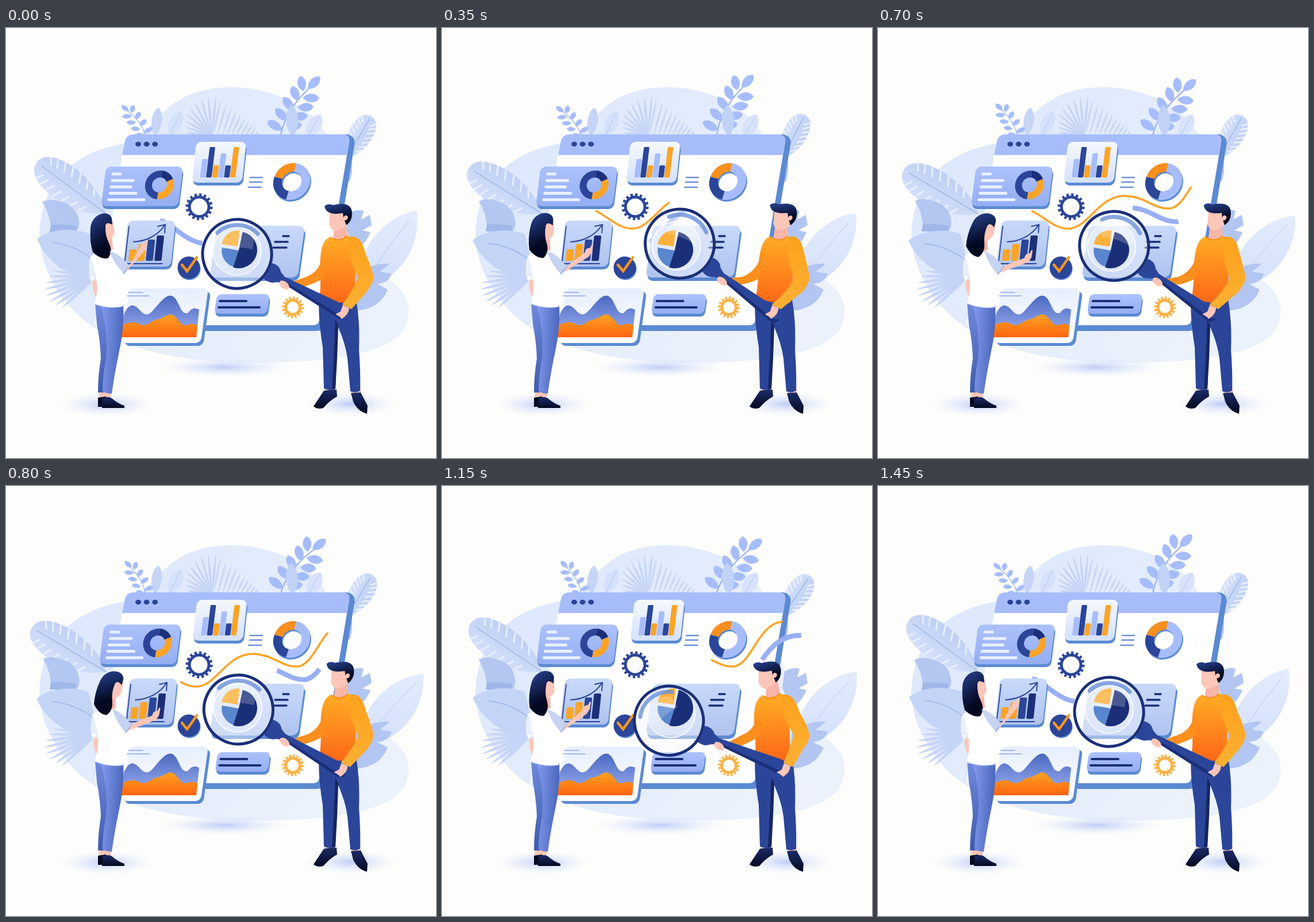
These frames come from a looping animation (748 px wide and 748 px high, 1.5 s). An HTML page:

```html
<!DOCTYPE html>
<html lang="en">
<head>
<meta charset="utf-8">
<title>Data analysis</title>
<style>
html, body { margin: 0; height: 100%; overflow: hidden; background: #fdfdfb; }
svg { display: block; width: 100vw; height: 100vh; }
</style>
</head>
<body>
<svg id="stage" viewBox="0 0 748 748"></svg>
<script>
const NAVY = '#2b4599', DARK = '#1b2f78', EDGE = '#5b8ad2', SKY = '#a7bdfb', SKIN = '#fcc6b8', ORANGE = '#fca426';
const list = (n, f) => Array.from({ length: n }, (_, i) => f(i)).join('');
const shape = (d, fill, more = '') => `<path d="${d}" fill="${fill}" ${more}/>`;
const line = (d, color, w, more = '') =>
  `<path d="${d}" fill="none" stroke="${color}" stroke-width="${w}" stroke-linecap="round" ${more}/>`;
const group = (id, body) => `<g id="${id}">${body}</g>`;
const slant = (x, y, a, body) => `<g transform="translate(${x} ${y}) skewX(${-a})">${body}</g>`;
const grad = (id, a, b, x = 0, y = 1) =>
  `<linearGradient id="${id}" x2="${x}" y2="${y}"><stop stop-color="${a}"/><stop offset="1" stop-color="${b}"/></linearGradient>`;
const polar = (x, y, r, a) => `${x + r * Math.cos(a * Math.PI / 180)} ${y + r * Math.sin(a * Math.PI / 180)}`;
const arc = (x, y, r, a, b) => `${polar(x, y, r, a)}A${r} ${r} 0 ${+(b - a > 180)} 1 ${polar(x, y, r, b)}`;
const ring = (x, y, r, w, a, b, color) => `<path d="M${arc(x, y, r, a, b)}" fill="none" stroke="${color}" stroke-width="${w}"/>`;
const wedge = (x, y, r, a, b, color) => shape(`M${x} ${y}L${arc(x, y, r, a, b)}Z`, color);
const card = (x, y, w, h, skew, r, fill, dx = 2, dy = 5, edge = EDGE) => {
  const box = (ox, oy, f) => `<rect x="${ox}" y="${oy}" width="${w}" height="${h}" rx="${r}" fill="${f}"/>`;
  return slant(x, y, skew, box(dx, dy, edge) + box(0, 0, fill));
};
const columns = (data, step, w) =>
  data.map(([h, c], i) => `<rect x="${step * i}" y="${-h}" width="${w}" height="${h}" rx="2" fill="${c}"/>`).join('');
// tip: 0.8 is pointed, above 1 is blunt
const leaf = (x, y, l, w, a, fill, inner = '', tip = .8) => `<g transform="translate(${x} ${y}) rotate(${a})">` +
  shape(`M0 0C${.3 * l} ${-w} ${tip * l} ${-w} ${l} 0C${tip * l} ${w} ${.3 * l} ${w} 0 0`, fill) + inner + '</g>';
const bananaLeaf = (x, y, l, w, a) => leaf(x, y, l, w, a, 'url(#pale)', line(`M0 0H${l * .93}`, '#9db8ea', 1.5) + list(14, i => {
  const s = .25 + .6 * (i >> 1) / 7, side = i % 2 ? 1 : -1;
  const ex = l * (.9 * (1 - s) ** 2 * s + 3 * (1 - s) * s * s + s ** 3), ey = 3 * s * (1 - s) * w * side;
  return line(`M${ex - 7} ${ey * .5}L${ex} ${ey * .96}`, '#e8effd', 3);
}), 1);
const gear = (x, y, r, w, color) => `<circle cx="${x}" cy="${y}" r="${r}" fill="none" stroke="${color}" stroke-width="${w}"/>
  <circle cx="${x}" cy="${y}" r="${r + w / 2 + 1.5}" fill="none" stroke="${color}" stroke-width="5" pathLength="32" stroke-dasharray="1 1"/>`;
const shadow = (x, y, rx, ry) => `<ellipse cx="${x}" cy="${y}" rx="${rx}" ry="${ry}" fill="url(#shade)"/>`;

const branch = (pairs, step) => line('M0 0Q8 -42 48 -80', '#93adee', 2) + leaf(47, -80, 30, 10, -45, SKY) + list(pairs, i => {
  const k = i * step, x = 39 - 9 * k, y = -76 + 17 * k;
  return leaf(x, y, 27 + k, 10, -100 - 12 * k, SKY) + (k < 4 ? leaf(x - 1, y + 11, 29 - k, 10, 3 - 4 * k, SKY) : '');
});

const defs = `<defs>
  ${grad('blob', '#dbe6fd', '#ebf2fb', 1, .6)}${grad('sheet', '#f5f8ff', '#d3e1fc')}${grad('sky', '#adc2fc', '#94aef3')}
  ${grad('panel', '#c9d9fb', '#aec3ee')}${grad('paper', '#e6eefe', '#ffffff')}${grad('wave', '#4c69c0', '#9fb3f4')}
  ${grad('lava', '#ffa322', '#ff6410')}${grad('jean', '#869cee', '#4a67bc', 1, .2)}${grad('jeanBack', '#6f89dc', '#3f5cae')}
  ${grad('hair', '#2a4596', '#040922', .3, .8)}${grad('knit', '#ffae25', '#ff6716')}${grad('sleeve', '#ffa11d', '#fbb033')}
  ${grad('shoe', '#1b2b68', '#050a20')}${grad('pale', '#d3dffa', '#bfd0f5')}${grad('wide', '#e3ecfd', '#d3e0fa')}
  <radialGradient id="shade"><stop stop-color="#a9bdf6" stop-opacity=".75"/><stop offset="1" stop-color="#dfe8fd" stop-opacity="0"/></radialGradient>
</defs>`;

const backdrop = shape('M390 103C455 103 520 128 553 178C590 240 590 380 645 425C690 448 706 475 699 505C690 560 600 577 470 582C330 586 190 566 118 492C74 445 48 385 62 325C76 255 130 215 200 202C265 188 265 105 390 103Z', 'url(#blob)')
  + shadow(380, 590, 115, 17) + shadow(175, 655, 82, 21) + shadow(600, 654, 80, 21);

const plants =
  list(9, i => leaf(358, 188, 44 + 26 * Math.sin(i / 5), 2.6, -172 + 11 * i, '#c6d4f5'))
  + list(10, i => leaf(360 + 8 * i, 188, 65 - 6 * i, 2.4, -78 + 3 * i, '#c9d7f7'))
  + leaf(259, 188, 50, 12, -83, '#c6d5f7') + leaf(284, 188, 49, 15, -64, '#d5e1fb', line('M0 0H44', '#b4c8f0', 1))
  + group('sprig', `<g transform="translate(242 187) scale(-.6 .52)">${branch(4, 1.3)}</g>`)
  + group('bough', `<g transform="translate(478 186)">${branch(5, 1)}</g>`)
  + leaf(499, 190, 56, 14, -93, '#c2d2f6') + leaf(524, 190, 46, 16, -59, '#d8e3fb', line('M0 0H42', '#b4c8f0', 1))
  + group('banana', bananaLeaf(174, 323, 150, 42, -143.5))
  + group('lobe', shape('M63 303Q75 296 92 301Q121 308 126 331Q130 345 122 355H78Q78 325 63 303Z', '#b3c7f0')
    + shape('M78 343Q95 340 122 344V355H76Z', '#a0b8e9'))
  + list(9, i => leaf(158, 432, 82 + 14 * Math.sin(i / 2), 3.6, 138 + 7 * i, '#c6d5f7'))
  + group('broad', shape('M54 367C75 350 115 346 145 358L160 432C120 440 72 412 54 367Z', '#c4d4f7')
    + line('M82 373Q120 378 150 402', '#9db8ea', 1.6))
  + line('M598 225Q602 245 596 265', '#adc3ee', 5)
  + group('crest', bananaLeaf(593, 226, 84, 28, -60))
  + group('wing', shape('M620 455C600 390 660 325 714 318C722 365 700 432 620 455Z', 'url(#wide)') + line('M622 450Q655 390 702 335', '#c4d4f5', 1.2))
  + shape('M596 322Q612 314 622 318L618 333L633 325L636 343L620 352L634 355Q626 376 606 388L592 350Z', '#b2c6f1')
  + shape('M608 430Q635 408 668 410L650 424L671 427Q666 444 645 445L664 455Q650 490 606 492Z', '#b2c6f1');

const screen = shape('M222 185H592Q609 187 606 204L554 516Q552 527 540 527H165Z', EDGE)
  + shape('M222 185H586Q599 186 597 198L545 509Q543 517 534 517H154L202 221L208 196Q211 185 222 185Z', '#fff')
  + shape('M222 185H586Q599 186 597 198L593 221H202L207 196Q210 185 222 185Z', SKY)
  + list(3, i => `<ellipse cx="${230 + 14.6 * i}" cy="202" rx="5" ry="4.2" fill="${NAVY}"/>`);

const ribbons =
  line('M268 335C290 340 315 376 350 375C385 373 400 311 443 313C475 315 490 337 520 337C555 333 560 255 630 260', '#99aff4', 8.5, 'id="ribbon" pathLength="435" stroke-dasharray="85 350" style="stroke-linecap:butt"')
  + line('M267 318C292 330 308 350 332 349C366 348 384 291 430 292C466 293 480 316 508 314C540 309 550 238 593 236', ORANGE, 3.5, 'id="trend" pathLength="396" style="stroke-linecap:butt"');

const textCard = card(174, 241, 134, 69, 7, 9, 'url(#sky)')
  + [[186, 199], [185, 221], [183, 217], [181, 226], [179, 240]].map(([a, b], i) => line(`M${a} ${254 + 11.2 * i}H${b}`, '#e9f0ff', 5)).join('')
  + slant(267, 273, 5, ring(0, 0, 19, 12, 95, 275, NAVY) + ring(0, 0, 19, 12, 275, 335, DARK) + ring(0, 0, 19, 12, 335, 455, ORANGE));

const bars = [[32, SKY], [53, NAVY], [21, ORANGE], [42, SKY], [21, NAVY], [53, ORANGE]];
const barCard = card(331, 198, 87, 71, 6, 9, 'url(#sheet)') + slant(337.5, 260, 7, columns(bars, 10.4, 9.6));

const growth = [[20, ORANGE], [29, ORANGE], [37, NAVY], [44, DARK]];
const growthCard = card(212, 335, 83, 80, 6, 9, 'url(#panel)')
  + line('M214 345L207 405M208 410H272', NAVY, 1.8) + slant(213, 405, 6, columns(growth, 15, 12.5))
  + line('M222 372C245 371 265 360 276 343M264 345L277 342L276 356', NAVY, 2);

const areaCard = card(215, 453, 137, 95, 8, 9, 'url(#paper)', 5, 5)
  + line('M213 460H238M211 466H249', '#a4b9ef', 2) + '<g transform="translate(-2 1)">'
  + shape('M201 537L207 497C217 475 226 480 235 490S250 499 258 490C272 474 285 456 296 469C305 480 306 497 318 495C326 484 333 486 338 489L333 537Z', 'url(#wave)')
  + shape('M201 537L204 515C214 513 222 508 232 513C247 522 252 508 265 506S285 491 296 501S306 519 318 515Q328 512 335 516L333 537Z', 'url(#lava)') + '</g>';

const noteCard = card(367, 463, 92, 34, 8, 8, 'url(#sky)') + line('M372 475H418M370 486H441', DARK, 4);
const pieCard = card(367, 344, 153, 90, 8, 10, 'url(#panel)', 3, 6)
  + line('M482 362H492M468 372H490M465 382H488', DARK, 3.4);
const donut = slant(497, 267, 6, ring(2, 3, 24.5, 15, 0, 359.9, EDGE) + ring(0, 0, 24.5, 15, 0, 359.9, SKY)
  + ring(0, 0, 24.5, 15, 195, 278, '#fb8f1c') + ring(0, 0, 24.5, 15, 102, 195, NAVY));

const cards = group('textCard', textCard) + group('barCard', barCard)
  + gear(336, 311, 17, 5, NAVY) + line('M425 260H446M424 268H445M422 277H444', '#6d8fd4', 2.4)
  + donut + group('growthCard', growthCard)
  + `<circle cx="319" cy="419" r="19.5" fill="${EDGE}"/><circle cx="318" cy="417" r="19.5" fill="${NAVY}"/>`
  + line('M306 412L315 423L332 399', '#fb961e', 4.5) + areaCard + group('noteCard', noteCard)
  + gear(499, 486, 12.5, 5, '#fbb247') + pieCard;

const lens = `<circle id="glass" r="59" fill="#f1f6ff" opacity=".45"/>
  <circle id="halo" r="42" fill="#fff" fill-opacity=".3" stroke="#fff" stroke-width="1.5"/>`
  + wedge(405, 387, 30, 105, 190, '#5a86cf') + wedge(405, 386, 32, -78, 108, DARK) + wedge(403, 380, 28, -172, -83, '#fbb03a')
  + group('glare', line('M-34 -37A50 50 0 0 1 36 -35', '#6c92d8', 7, 'opacity=".8"')
    + shape('M-30 -30A42 42 0 0 1 30 -30L27 -8Q0 -15 -27 -8Z', '#fff', 'opacity=".2"'));

const rim = `<g transform="translate(402 393) rotate(28.8)">
  <circle r="60" fill="none" stroke="${DARK}" stroke-width="5"/>
  ${shape('M60 -15Q74 -19 82 -9L92 -5L206 -12Q218 -12 218 0Q218 13 206 13L92 6L82 11Q74 19 60 15Q64 0 60 -15Z', NAVY)}
  ${shape('M86 9L92 6L206 13Q218 12 218 0Q212 7 204 7L92 2Z', DARK)}</g>`;

const womanLegs = shape('M161 628H183L182 645H162Z', SKIN)
  + shape('M155 478H190L178 560L170 634H160Q160 605 165 575Q164 545 158 515Z', 'url(#jeanBack)')
  + shape('M165 482H204Q206 520 197 562Q189 600 184 636Q174 636 168 632Q168 605 174 575Q178 530 165 482Z', 'url(#jean)')
  + shape('M160 643L174 641L178 659H160Z', '#060b22') + shape('M168 644Q178 640 184 644Q194 653 206 657V661H167Z', 'url(#shoe)');
const woman = shape('M150 440L160 438Q158 452 163 470L156 467Q150 456 150 440Z', SKIN)
  + shape('M147 397Q162 389 180 386Q197 390 203 408Q198 440 205 471L203 484Q180 489 154 480Q162 455 156 432L149 442L145 431Q143 412 147 397Z', '#fff')
  + shape('M147 397Q154 415 156 432L146 433Q142 410 147 397Z', '#e8effd') + line('M146 432L157 430M154 480Q180 489 203 484', '#d9e4fb', 1.5)
  + shape('M170 362L184 364L186 385Q178 392 168 387Z', '#f8b5a8')
  + group('womanHead', shape('M170 336L185 335L189 354Q187 366 179 369Q170 364 170 350Z', SKIN)
    + shape('M147 348C149 322 179 315 184 331L185 342Q174 336 173 344Q172 360 179 374Q186 388 178 400Q166 404 151 390Q145 370 147 348Z', 'url(#hair)'))
  + shape('M180 388Q201 394 215 415L205 427Q193 415 186 402Z', '#c6d3f2') + line('M215 415L205 427', '#93aee4', 2);

const manLegs = shape('M554 622H573L571 638L556 642ZM600 626H617L618 641L604 644Z', SKIN)
  + shape('M545 470Q542 500 551 555L553 627Q563 632 573 628L577 518Q591 550 594 575L599 632Q608 636 616 631Q617 600 614 560Q616 510 609 472Z', NAVY)
  + shape('M573 507L578 518L576 575L573 628L567 629L571 555Z', '#16265f')
  + shape('M553 631Q562 629 575 629L576 641Q563 648 552 661Q541 664 535 658Z', 'url(#shoe)')
  + shape('M600 635L617 634L629 657L628 671Q612 667 604 650Z', 'url(#shoe)');
const man = shape('M571 342L591 338L594 362Q582 374 569 366Z', '#f8b5a8')
  + shape('M562 364Q579 373 594 361Q608 365 609 388L606 476Q575 482 545 470C550 440 544 412 548 390Q551 370 562 364Z', 'url(#knit)')
  + line('M564 364Q579 374 593 362', '#f78b1a', 2)
  + group('manHead', shape('M563 320L562 342Q566 354 577 353L591 345L592 320Z', SKIN)
    + `<circle cx="592" cy="331" r="5" fill="${SKIN}"/>`
    + shape('M554 310Q560 304 569 308Q602 300 602 323Q602 336 592 343L589 335Q597 333 594 327Q589 324 587 330L586 322Q557 327 554 310Z', 'url(#hair)'));

const stage = document.getElementById('stage');
stage.innerHTML = defs + '<rect width="748" height="748" fill="#fdfdfb"/>' + backdrop + plants + screen + ribbons + cards + lens
  + womanLegs + group('woman', woman) + shape('', SKIN, 'id="pointArm"')
  + manLegs + group('man', man) + shape('', '#f98f1e', 'id="farArm"') + group('rim', rim)
  + `<ellipse id="farHand" rx="10" ry="6" fill="${SKIN}"/>` + shape('', SKIN, 'id="nearHand"') + shape('', 'url(#sleeve)', 'id="nearArm"');

const PERIOD = 1450, KEYS = [0, 200, 500, 700, 950, 1150];
// Smooth periodic curve through one value per key time
function track(v, t) {
  const n = KEYS.length, wrap = i => (i + n) % n;
  const time = i => KEYS[wrap(i)] + PERIOD * Math.floor(i / n);
  const value = i => v[wrap(i)];
  const slope = i => (value(i + 1) - value(i - 1)) / (time(i + 1) - time(i - 1));
  t %= PERIOD;
  const i = KEYS.findLastIndex(k => k <= t), d = time(i + 1) - time(i), u = (t - time(i)) / d, w = 1 - u;
  return w * w * ((1 + 2 * u) * value(i) + u * d * slope(i)) + u * u * ((3 - 2 * u) * value(i + 1) - w * d * slope(i + 1));
}
const set = (id, name, value) => document.getElementById(id).setAttribute(name, value);
const move = (id, x, y = 0) => set(id, 'transform', `translate(${x} ${y})`);
const turn = (id, a, x, y) => set(id, 'transform', `rotate(${a} ${x} ${y})`);

function draw(t) {
  const at = (...v) => track(v, t);
  const sway = at(0, -3, -1, 4, 8, 6), droop = at(0, -2.5, -6, -6, -5, -2.5);
  turn('sprig', sway, 242, 187);
  turn('bough', sway, 478, 186);
  turn('banana', droop, 174, 323);
  turn('lobe', droop * -.3, 126, 350);
  turn('broad', droop * .3, 150, 400);
  turn('crest', at(0, -1.5, -4, -.5, 4.5, 4), 593, 226);
  turn('wing', at(0, 1, 4, 5, 5, 3), 620, 455);

  move('textCard', at(0, -1.5, -3, -3.5, -3, -1.5));
  move('barCard', at(0, -2, -3.5, -.5, 4, 4));
  move('growthCard', at(0, 1, 3, 3, 3, 2));
  move('noteCard', at(0, 1, 2, 1.5, 1, 0));

  set('ribbon', 'stroke-dashoffset', -.3 * (t % PERIOD));
  const head = t < 700 ? Math.max(0, .5 * t - 20) : 396 - 66 * Math.max(0, 1 - (t - 700) / 450) ** 2;
  const tail = Math.max(0, .54 * (t - 720));
  set('trend', 'stroke-dasharray', `0 ${tail} ${Math.max(0, head - tail)} 999`);
  set('trend', 'visibility', head > tail + 3 ? 'visible' : 'hidden');

  const tilt = at(0, 5, 10, 6.3, -5, -6.5), c = Math.cos(tilt * Math.PI / 180), s = Math.sin(tilt * Math.PI / 180);
  const pivot = (x, y) => [533 + x * c - y * s, 465 + x * s + y * c];
  const [lx, ly] = pivot(-131, -72), [hx, hy] = pivot(-49, -18);
  turn('rim', tilt, 533, 465);
  move('glass', lx, ly);
  move('halo', (lx + 402) / 2, (ly + 383) / 2);
  set('glare', 'transform', `translate(${lx} ${ly}) rotate(${at(0, 13, 26, 18, -28, -40)})`);

  turn('man', .45 * tilt, 580, 480);
  move('manHead', .65 * tilt, -.15 * Math.abs(tilt));
  set('farArm', 'd', `M${551 + .7 * tilt} 392Q548 423 522 433L${hx + 12} ${hy - 5}L${hx + 18} ${hy + 7}Q538 446 553 434Z`);
  set('farHand', 'transform', `translate(${hx} ${hy}) rotate(38)`);
  const rx = 588 - 1.4 * tilt, ry = 491;
  set('nearHand', 'd', `M${rx - 2} ${ry - 9}L${rx + 9} ${ry - 4}Q${rx + 8} ${ry + 8} ${rx - 4} ${ry + 15}Q${rx - 8} ${ry + 10} ${rx - 15} ${ry + 7}L${rx - 6} ${ry + 2}Z`);
  set('nearArm', 'd', `M${596 + .9 * tilt} 364C${614 + .9 * tilt} 358 ${621 + .7 * tilt} 376 ${626 + .6 * tilt} 394Q636 416 639 432Q640 442 628 458L${rx + 13} ${ry - 2}L${rx - 3} ${ry - 10}Q605 455 612 434Q604 418 ${597 + .7 * tilt} 396Z`);

  turn('woman', at(0, .5, 2.5, 3, 2.5, 1.8), 180, 485);
  turn('womanHead', at(0, 2, 13, 18, 14, 8), 178, 375);
  const px = at(246, 257, 265, 268, 265, 258), py = at(369, 372, 383, 387, 383, 376), ex = 210 + .25 * (px - 246);
  set('pointArm', 'd', `M${ex - 3} 426L${ex + 5} 413L${px - 13} ${py + 13}Q${px - 12} ${py + 5} ${px - 4} ${py + 5}L${px - 1} ${py - 1}L${px + 1} ${py}L${px - 1} ${py + 12}L${px - 6} ${py + 20}Z`);
}

const start = performance.now();
function frame() {
  draw(Math.floor((performance.now() - start) / 50) * 50 % 1500);
  requestAnimationFrame(frame);
}
frame();
</script>
</body>
</html>
```
